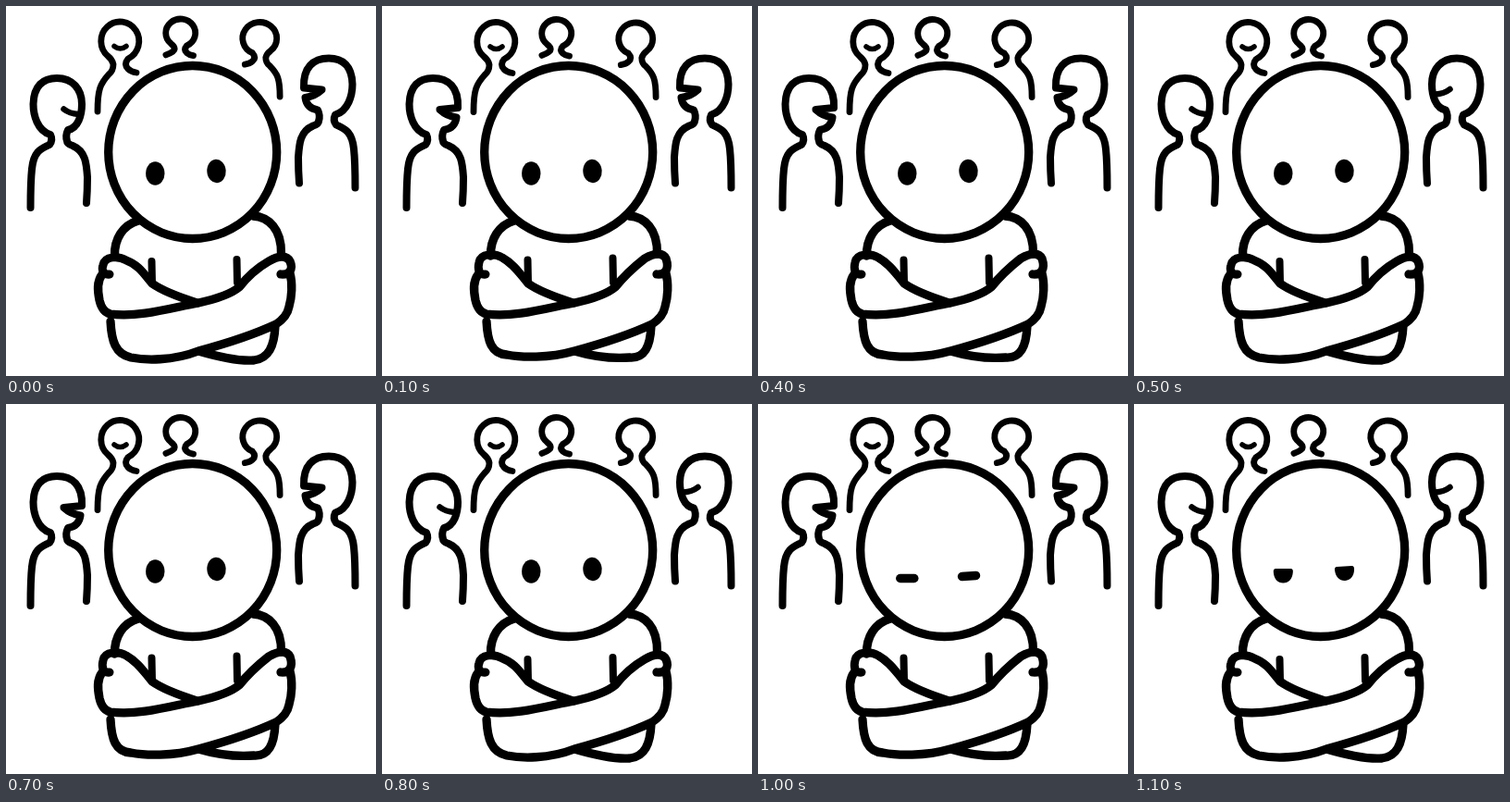
Write an HTML page that moves like this. It is 400 by 400 pixels and loops after 1200 ms.

```html
<!DOCTYPE html>
<html lang="en">
<head>
<meta charset="utf-8">
<title>Left out</title>
<style>
  html, body { margin: 0; width: 100%; height: 100%; overflow: hidden; background: #fff; }
  svg { display: block; width: 100vw; height: 100vh; }
  path, .ring {
    fill: none; stroke: #000; stroke-linecap: round; stroke-linejoin: round;
    vector-effect: non-scaling-stroke;
  }
  .solid { fill: #000; stroke: none; }
</style>
</head>
<body>
<svg id="stage" viewBox="0 0 400 400"></svg>
<script>
const STEP = 100, STEPS = 12, POSES = 3, BLINK = 10;
const stage = document.getElementById('stage');

function add(parent, tag, attrs = {}) {
  const el = document.createElementNS('http://www.w3.org/2000/svg', tag);
  for (const k in attrs) el.setAttribute(k, attrs[k]);
  return parent.appendChild(el);
}

const group = (parent, transform) => add(parent, 'g', { transform });
const line = (parent, width, d) => add(parent, 'path', { d, 'stroke-width': width });

// A small onlooker; the origin is the top of the head.
function backPerson(parent, x, y, sx, sy, shoulder) {
  const g = group(parent, `translate(${x} ${y}) scale(${sx} ${sy})`);
  const side = shoulder
    ? 'M-24 97C-24 73-21 67-12 57Q-7 53-7 46'
    : 'M-20 54Q-8 49-8 45';
  line(g, 6.8, side + 'Q-8 41-13 37A20.5 21 0 1 1 9 40Q4 46 9 51Q12 54 18 55');
  return g;
}

// A larger onlooker in profile, facing right.
function frontPerson(parent, transform, talking) {
  const g = group(parent, transform);
  const face = talking
    ? 'C72 78 83 88 82 110L62.5 112Q70 119 80.5 120.5Q79 132 67 134'
    : 'C72 78 82 90 82 106C82 118 78 132 67 134';
  line(g, 8, 'M26.5 218Q26.5 190 28 176C30 156 39 154 47 150Q51 145 48 139' +
    'C34 135 29.5 118 29.5 106C30 86 40 78 55 78' + face +
    'Q64 140 66 146Q66 149 72 151C86 157 87 170 88 185Q88 200 87 213');
  if (!talking) line(g, 6.5, 'M62.5 111.5Q69 116.5 78 117');
}

function drawCrowd(g, pose) {
  const back = group(g, `translate(0 ${pose ? 0.5 : 0})`);
  const smiler = backPerson(back, 123, 17, 1, 1, true);
  line(smiler, 5.5, 'M-6 26.5Q.5 31.5 7 26.5');
  backPerson(back, 188.5, 14, 0.78, 0.72, false);
  backPerson(back, 274.5, 17.5, -0.9, 0.83, true);
  frontPerson(g, '', pose === 1);
  frontPerson(g, 'translate(404 -21.5) scale(-1 1)', pose !== 2);
}

function drawHero(g, pose) {
  const lift = pose === 1 ? 3 : 0;
  add(g, 'ellipse', { class: 'ring', cx: 201.7, cy: 158, rx: 91, ry: 93.5, 'stroke-width': 9.3 });

  // shoulders and armpits
  line(g, 9.3, 'M143 232C126 237 117 252 117.5 270M267 227C284 228 298 241 297.5 268');
  line(g, 8, `M157.5 ${276 - lift / 2}L158 300M249.5 ${274 - lift / 2}L250 299`);

  // left hand and the hidden forearm
  line(g, 9, `M112 290C105 291 103 285 105 ${280 - lift}C107 ${270 - lift} 122 ${270 - lift}
    130 ${275 - lift}C144 280 150 291 158 300Q172 310 207 321`);
  // left elbow, front forearm, right hand
  line(g, 9.3, `M104 290C98 298 99 308 101 318Q104 331 113 333C145 337 180 326 208 321
    Q240 314 252 304C260 294 270 284 284 ${276 - lift}C296 ${269 - lift} 304 ${270 - lift}
    307 ${276 - lift}C311 285 306 291 297 290`);
  // right elbow, lower sleeve, hem
  line(g, 9.3, `M307 289C310 300 309 315 306 325Q304 336 292 344Q260 359 208 373
    C180 ${384 - lift} 150 ${383 - lift} 135 ${380 - lift}C118 376 114 362 113 341
    M208 373C232 380 255 ${384 - lift} 268 ${383 - lift}C284 381 290 368 291 346`);
}

const poses = Array.from({ length: POSES }, (_, pose) => {
  const g = add(stage, 'g');
  drawCrowd(g, pose);
  drawHero(g, pose);
  return g;
});

// Lids by how many steps the blink is away: shut, half, open.
const lids = [add(stage, 'g'), add(stage, 'g'), add(stage, 'g')];
function drawEye(x, y, tilt) {
  const [shut, half, open] = lids.map(lid => group(lid, `translate(${x} ${y}) rotate(${tilt})`));
  line(shut, 9.5, 'M-7.5 7.5H7.5');
  add(half, 'path', { class: 'solid', d: 'M-8-3H8Q11-3 10.5 1C10 8 6 12.5 0 12.5C-6 12.5-10 8-10.5 1Q-11-3-8-3Z' });
  add(open, 'ellipse', { rx: 10.2, ry: 12.8 });
}
drawEye(161.3, 181, 0);
drawEye(227.5, 178.5, -4);

const show = (layers, index) =>
  layers.forEach((g, i) => g.setAttribute('visibility', i === index ? 'visible' : 'hidden'));

function frame() {
  const step = Math.floor(performance.now() / STEP) % STEPS;
  show(poses, step % POSES);
  show(lids, Math.min(Math.abs(step - BLINK), 2));
  requestAnimationFrame(frame);
}
frame();
</script>
</body>
</html>
```
